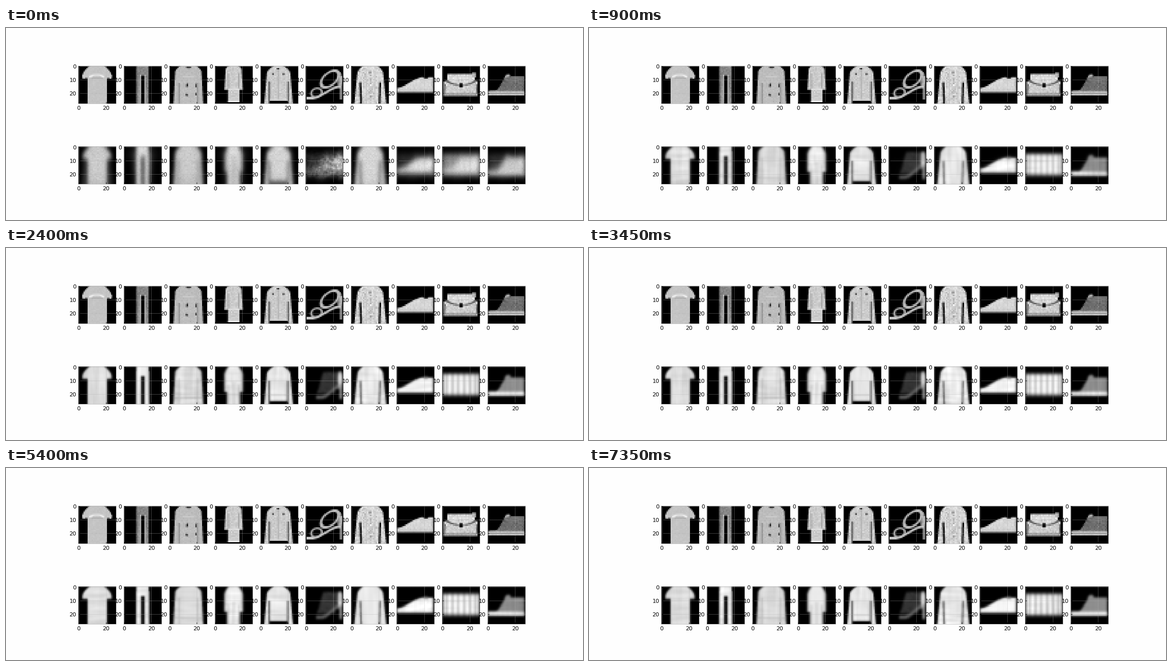
A matplotlib script for the animation above (7500 ms loop, 1280 by 427 pixels).

```python
import numpy as np
import matplotlib.pyplot as plt
from matplotlib.animation import FuncAnimation

W, H, DPI = 1280, 427, 80
FRAMES, STEP = 50, 150
N, SUB = 28, 5

plt.rcParams.update({
    "font.family": "DejaVu Sans", "font.size": 11,
    "axes.edgecolor": "#bcbcbc", "axes.linewidth": 0.8,
    "grid.color": "#b2b2b2", "grid.linestyle": "--", "grid.linewidth": 0.5,
    "xtick.direction": "in", "ytick.direction": "in",
})

rng = np.random.default_rng(7)
fine = (np.arange(N * SUB) + 0.5) / SUB
X, Y = np.meshgrid(fine, fine)


def shrink(mask):
    """Average a fine mask down to the 28 x 28 picture."""
    return mask.astype(float).reshape(N, SUB, N, SUB).mean((1, 3))


def torso(cx, neck, chest, flare=0, r=5, end=28):
    """Symmetric garment: rounded shoulders, then straight flaring sides."""
    curve = np.sin(np.clip(Y / r, 0, 1) * np.pi / 2)
    half = neck + (chest - neck) * curve + flare * Y / N
    return shrink((abs(X - cx) < half) & (Y < end))


def rect(x0, x1, y0, y1):
    return shrink((X > x0) & (X < x1) & (Y > y0) & (Y < y1))


def seams(cx, at, top, width=0.9, lean=0.0, end=28):
    """A mirrored pair of near-vertical stripes."""
    off = abs(X - cx) - at - lean * (Y - top)
    return shrink((abs(off) < width / 2) & (Y > top) & (Y < end))


def oval(cx, cy, a, b, turn=0, width=None):
    """Filled ellipse, or a ring if a width is given."""
    c, s = np.cos(np.radians(turn)), np.sin(np.radians(turn))
    dx, dy = X - cx, Y - cy
    d = np.hypot((c * dx + s * dy) / a, (c * dy - s * dx) / b)
    return shrink(d < 1 if width is None else abs(d - 1) * min(a, b) < width / 2)


def ramp(x0, x1):
    t = np.clip((X - x0) / (x1 - x0), 0, 1)
    return t * t * (3 - 2 * t)


def shoe(toe, heel, x0, x1, base):
    """Side view that rises from the toe height to the heel height."""
    top = toe + (heel - toe) * ramp(x0, x1)
    return shrink((Y > top) & (Y < base) & (X > 0.5) & (X < 26.8))


def slope(y0, y1, x0, x1, width):
    """Smooth stroke from height y0 to y1 between x0 and x1."""
    y = y0 + (y1 - y0) * ramp(x0, x1)
    return shrink((abs(Y - y) < width / 2) & (X > x0 - 4) & (X < x1 + 1))


def blur(a, sx, sy=None):
    def kernel(s):
        k = np.exp(-(np.arange(N)[:, None] - np.arange(N)) ** 2 / (2 * s * s))
        return k / k.sum(1, keepdims=True)
    return kernel(sy or sx) @ a @ kernel(sx).T


def noise(amp, sx=0, sy=0):
    a = rng.standard_normal((N, N))
    if sx:
        a = blur(a, sx, sy)
    return amp * a / a.std()


def stack(*layers):
    img = np.zeros((N, N))
    for mask, tone in layers:
        img = img + mask * (tone - img)
    return img


tee = np.maximum(torso(13.8, 5, 10.6, r=8, end=9.7), torso(13.9, 5, 7))
legs = torso(13.8, 4.3, 4.4)
crotch = seams(13.9, 0, 7.5, 2.4)
pullover = torso(14, 5.3, 9.3, 1.5)
gown = np.maximum(torso(13.8, 3, 5.5, 1.7, 3, 17.7), torso(13.8, 3, 4.1, end=27))
jacket = torso(13.4, 3, 8, 2.4, 6) * (1 - rect(7, 20, 25.7, 28))
knit = torso(14.2, 5, 8.8, 2.8, 6)
sneaker = shoe(16.5, 8.7, 0, 20, 19.6)
boot = np.maximum(shoe(18.5, 8.5, 6, 15, 22), oval(14.7, 9.5, 2, 3, 20))
sole = rect(0.5, 26.8, 18.8, 22)


def samples():
    yield stack(
        (tee, 0.77 + noise(0.008)),
        (seams(13.9, 10, 7, 1.2, -0.1, 10), 0.84),
        (oval(13.6, 9, 4.6, 2, width=1) * rect(8, 19, 6, 9), 0.92),
        (rect(9.5, 18, 9, 9.7), 0.64))
    yield stack(
        (legs, 0.52 + noise(0.03)),
        (rect(10, 18, 0, 1), 0.72),
        (seams(13.9, 1.3, 7, 1.3, 0.02), 0.82),
        (crotch, 0))
    yield stack(
        (pullover, 0.74 + noise(0.015)),
        (oval(14.2, 1.5, 1.8, 0.7), 0.2),
        (rect(10, 18.5, 8, 9), 0.79),
        (seams(14, 6.8, 13, 0.7), 0.5),
        (oval(13.3, 14.6, 0.7, 1.2, 20), 0.12),
        (oval(13, 21.6, 0.7, 1, -30), 0.12),
        (seams(19.4, 0, 13.5, 1, 0, 16), 0.15),
        (seams(19.6, 0, 20, 1, 0, 22), 0.15))
    yield stack(
        (gown, 0.8 + noise(0.025)),
        (seams(13.8, 3.8, 6, 0.8, 0, 17), 0.62),
        (rect(7, 20.5, 16.8, 17.7) * gown, 0.92),
        (rect(9.8, 17.8, 26, 27), 0.93))
    yield stack(
        (jacket, 0.8 + noise(0.025)),
        (seams(13.2, 0, 3, 0.8, 0, 25), 0.66),
        (seams(13.4, 6.7, 12, 0.8), 0.1),
        (oval(9.4, 6.5, 0.7, 0.8), 0.2),
        (oval(16.9, 6.5, 0.7, 0.8), 0.2),
        (oval(13.2, 2.5, 1, 0.6), 0.15),
        (rect(7, 20, 24.8, 25.7), 0.92))
    yield stack(
        (oval(25, 10.5, 1.9, 5.6), 0.55 + noise(0.06)),
        (oval(18, 10, 7.6, 4.4, -42, 1.4), 0.74),
        (oval(8.3, 20, 4, 3.2, -20, 1.3), 0.66),
        (slope(24, 15.6, 5, 25, 1.9), 0.78),
        (seams(26, 0, 8, 1.2, 0, 25), 0.82))
    yield stack(
        (knit, 0.9 - abs(noise(0.08))),
        (seams(14.2, 3, 4, 0.9), 0.76),
        (seams(14.2, 0, 3, 1), 0.7 + noise(0.12)),
        (seams(14.2, 7.1, 12.5, 1.4, -0.03), 0.02))
    yield stack(
        (sneaker, 0.84 + noise(0.02)),
        (oval(21.5, 8.7, 2, 1.2), 0),
        (rect(0.5, 26.8, 17.5, 18.4) * sneaker, 0.76))
    yield stack(
        (rect(1.4, 26, 12, 22.4), 0.8 + noise(0.04)),
        (rect(4, 24, 6.3, 14), 0.84 + noise(0.04)),
        (rect(22, 24.8, 5.4, 9), 0.72),
        (oval(14, 10, 11, 4.4, width=0.9) * rect(2, 26, 11, 15), 0.35),
        (seams(13.8, 11.5, 14, 0.9, 0.06, 21), 0.35),
        (rect(2, 25.5, 20.6, 21.4), 0.4),
        (rect(11.8, 16.4, 13, 17), 0.9),
        (oval(14, 14.7, 1.5, 1.6), 0.05))
    yield stack(
        (boot, 0.43 + noise(0.03)),
        (slope(18, 7.5, 6, 15, 2) * boot, 0.68),
        (rect(17, 26.8, 8.4, 9.3), 0.58),
        (sole, 0.76 + noise(0.02)),
        (rect(1, 26.8, 20.2, 21), 0.58))


def trained():
    """Smooth reconstructions the network settles on."""
    yield blur(tee, 0.6) * 0.86
    yield blur(stack((legs, 0.92), (crotch, 0.05),
                     (seams(13.9, 4.3, 4, 0.8), 0.7)), 0.5)
    yield blur(stack((pullover, 0.86), (seams(14, 6.8, 9, 0.9), 0.68),
                     (rect(4, 24, 23, 24), 0.74)), 0.65)
    yield blur(stack((torso(13.8, 3.3, 6.6, r=7, end=19), 0.86),
                     (torso(13.8, 3, 4.6), 0.92),
                     (seams(13.9, 0, 12), 0.75), (seams(13.8, 3.7, 14), 0.76)), 0.75)
    yield blur(stack((jacket, 0.9), (seams(13.4, 6.7, 11), 0.2),
                     (rect(8, 19, 21, 22), 0.82)), 0.5)
    yield blur(stack((shoe(20, 4.5, 8, 14, 20), 0.2 + noise(0.02)),
                     (slope(23, 15, 12, 25, 2.6), 0.4),
                     (rect(22, 28, 17, 24), 0),
                     (oval(25.4, 10, 1.7, 6), 0.85),
                     (seams(25.8, 0, 14, 1.7, 0, 24.5), 0.7)), 0.8)
    yield blur(stack((knit, 0.91), (seams(14.2, 7.1, 11, 1.1, -0.03), 0.25)), 0.6)
    yield blur(stack((sneaker, 0.96), (oval(21.5, 8.7, 2, 1), 0.4)), 0.65)
    stripes = 0.88 + 0.08 * np.sin(np.arange(N) * 1.5)
    yield blur(torso(14, 13, 13) * rect(0, 28, 6, 21.5), 0.9, 1.3) * stripes
    yield blur(stack((boot, 0.55), (sole, 0.9)), 0.75)


tops = list(samples())
late = list(trained())
soft = [blur(a, 1.1) for a in late]


def first_guess(k):
    """Untrained picture: its own blur mixed with the average of its family."""
    families = [0, 2, 4, 6], [1, 3], [5, 7, 8, 9]
    kin = next(f for f in families if k in f)
    own = 0.35 if k in families[2] else 0.65
    mean = np.mean([late[j] for j in kin], axis=0)
    img = own * blur(late[k], 1, 1.6) + (1 - own) * blur(mean, 1.3, 2)
    if k in families[1]:
        img += 0.15 * blur(late[0], 2.5)
    grain = noise(0.14, 0.6, 0.6) if k == 5 else noise(0.02)
    return 0.92 * late[k].max() * img / img.max() * (1 + grain)


early = [first_guess(k) for k in range(len(late))]
upright = [noise(1, 0.8, 5) for _ in late]
level = [noise(1, 5, 0.9) for _ in late]
phase = rng.uniform(0, 2 * np.pi, (len(late), 2))


def guess(k, n):
    a, b = np.exp(-n / 1.6), np.exp(-n / 5)
    img = a * early[k] + (b - a) * soft[k] + (1 - b) * late[k]
    p, q = phase[k]
    sway = np.sin(0.55 * n + p) * upright[k] + np.sin(0.83 * n + q) * level[k]
    return np.clip(img * (1 + 0.025 * (1 - a) * sway), 0, 1)


fig, axes = plt.subplots(2, 10, figsize=(W / DPI, H / DPI), dpi=DPI, facecolor="#fefefe")


def show(ax, img):
    im = ax.imshow(np.clip(img, 0, 1), cmap="gray", vmin=0, vmax=1, interpolation="nearest")
    ax.set_xticks([0, 20])
    ax.set_yticks([0, 10, 20])
    ax.grid(True)
    return im


for ax, img in zip(axes[0], tops):
    show(ax, img)
views = [show(ax, guess(k, 0)) for k, ax in enumerate(axes[1])]


def update(n):
    for k, im in enumerate(views):
        im.set_data(guess(k, n))
    return views


anim = FuncAnimation(fig, update, frames=FRAMES, interval=STEP, repeat=True, repeat_delay=0)
plt.show()
```
